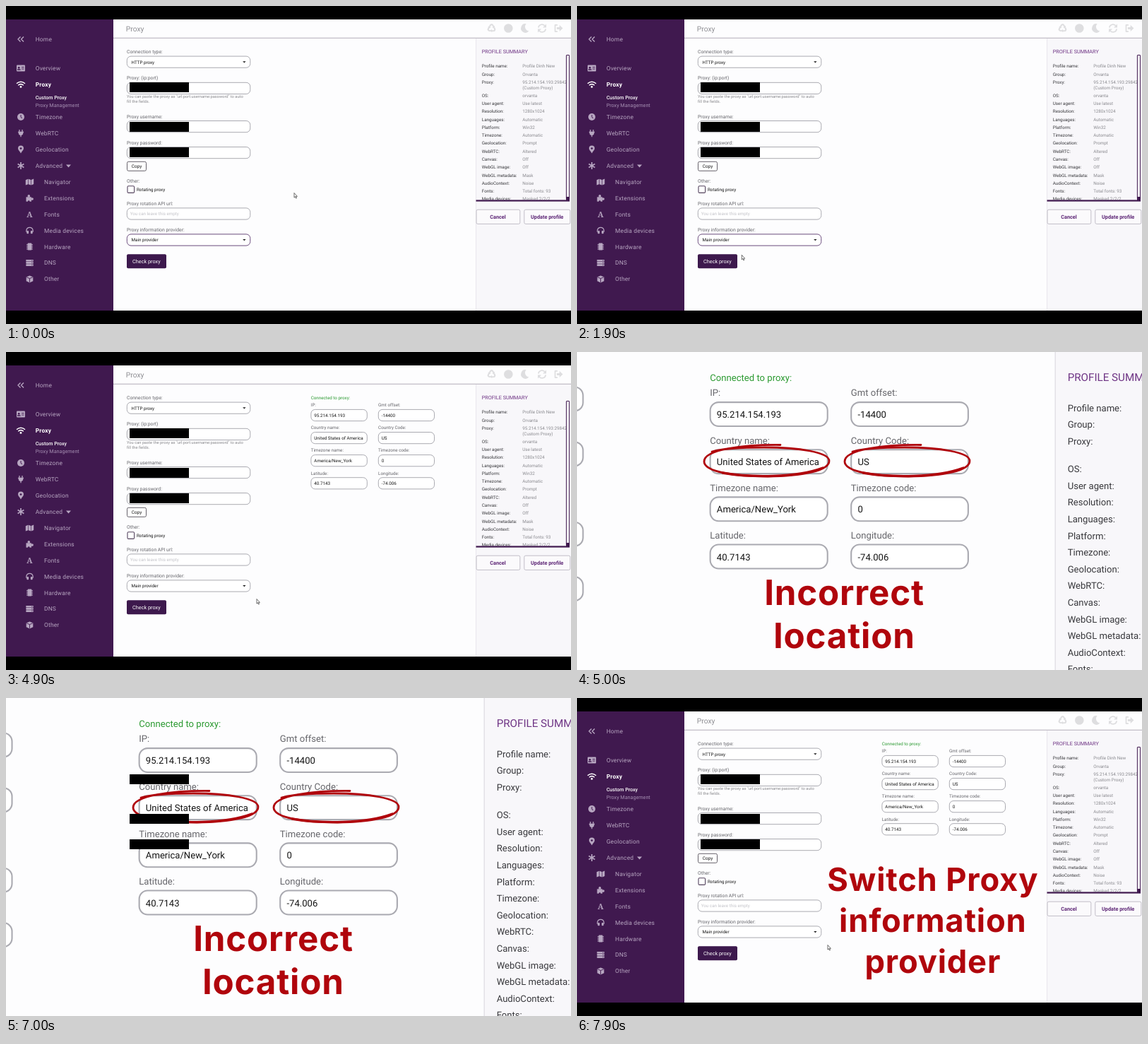
Write an HTML page with a canvas that moves like this. It is 800 px wide and 450 px high and loops after 8000 ms.

```html
<!DOCTYPE html>
<html lang="en">
<head>
<meta charset="utf-8">
<title>Proxy check</title>
<style>
html, body { margin: 0; width: 800px; height: 450px; overflow: hidden; background: #000; }
canvas { display: block; width: 800px; height: 450px; }
</style>
</head>
<body>
<canvas id="stage"></canvas>
<script>
const LOOP = 8000, CLICK = 2300, CHECK = 2500, DONE = 4000;
const ZOOM_IN = 5000, BARS = 6800, ZOOM_OUT = 7100;
const DARK = '#40194f', SIDE = '#b7a6c1', INK = '#161616', GREY = '#66666b', LINE = '#aaaab1', RED = '#b0050c';

const canvas = document.getElementById('stage');
const dpr = Math.max(1, window.devicePixelRatio || 1);
canvas.width = 800 * dpr;
canvas.height = 450 * dpr;
const c = canvas.getContext('2d');

// y is the middle of the capital letters
function text(s, x, y, size, color, weight = 400, spacing = 0, family = 'Roboto') {
  c.font = `${weight} ${size}px ${family}, sans-serif`;
  c.letterSpacing = spacing + 'px';
  c.textRendering = 'geometricPrecision';
  c.fillStyle = color;
  c.fillText(s, x, y + size * 0.356);
}
function rect(x, y, w, h, color) {
  c.fillStyle = color;
  c.fillRect(x, y, w, h);
}
function box(x, y, w, h, r, stroke, fill, lw = 1) {
  c.beginPath();
  c.roundRect(x, y, w, h, r);
  if (fill) { c.fillStyle = fill; c.fill(); }
  if (stroke) { c.strokeStyle = stroke; c.lineWidth = lw; c.stroke(); }
}
function disc(x, y, r, color) {
  c.beginPath();
  c.arc(x, y, r, 0, 7);
  c.fillStyle = color;
  c.fill();
}
function stroke(d, color, lw, cap = 'butt') {
  c.strokeStyle = color;
  c.lineWidth = lw;
  c.lineCap = cap;
  c.lineJoin = 'round';
  c.stroke(new Path2D(d));
}
function fill(d, color) {
  c.fillStyle = color;
  c.fill(new Path2D(d));
}
function at(x, y, draw) {
  c.save();
  c.translate(x, y);
  draw();
  c.restore();
}

// icons, each drawn around 0,0
const icons = {
  back() { stroke('M-.5 -3.5L-4 0L-.5 3.5M4 -3.5L.5 0L4 3.5', SIDE, 1.4); },
  card() {
    box(-6, -4.5, 12, 9, 1, null, SIDE);
    disc(-2.8, -.7, 1.4, DARK);
    rect(-5, 1.2, 4.5, 1.5, DARK);
    rect(1, -1.8, 3.6, .9, DARK);
    rect(1, .6, 3.6, .9, DARK);
  },
  wifi() {
    stroke('M-6 -1.2Q0 -6.4 6 -1.2M-3.8 1.3Q0 -2 3.8 1.3', '#fff', 1.5);
    disc(0, 3.4, 1.4, '#fff');
  },
  clock() {
    disc(0, 0, 5, SIDE);
    stroke('M0 -3V.3L2 1.8', DARK, 1);
  },
  plug() {
    stroke('M-2 -5V-2M2 -5V-2M0 2V5.2', SIDE, 1.3);
    fill('M-4 -2.2H4V-1H3.4Q3.4 3 0 3Q-3.4 3 -3.4 -1H-4Z', SIDE);
  },
  pin() {
    fill('M0 5.4C-1.4 2.8 -4 1 -4 -1.4A4 4 0 0 1 4 -1.4C4 1 1.4 2.8 0 5.4Z', SIDE);
    disc(0, -1.4, 1.4, DARK);
  },
  star() { stroke('M0 -5V5M-4.4 -2.5L4.4 2.5M-4.4 2.5L4.4 -2.5', SIDE, 1.7); },
  map() {
    fill('M-5.7 -2.8L-2.3 -4.3V3.2L-5.7 4.6ZM-1.7 -4.3L1.7 -3V4.6L-1.7 3.3ZM2.3 -3L5.7 -4.5V3L2.3 4.5Z', SIDE);
  },
  puzzle() {
    rect(-5, -1.6, 7.4, 6.4, SIDE);
    disc(-1.2, -3, 1.8, SIDE);
    disc(3.6, 1.2, 1.8, SIDE);
    disc(-1.3, 4.6, 1.3, DARK);
  },
  letter() { text('A', -4.2, 0, 11, SIDE, 700, 0, 'Noto Serif'); },
  phones() {
    stroke('M-4.6 2V0A4.6 4.4 0 0 1 4.6 0V2', SIDE, 1.3);
    box(-4.2, .2, 2.8, 4.4, 1, null, SIDE);
    box(1.4, .2, 2.8, 4.4, 1, null, SIDE);
  },
  chip() {
    box(-2.8, -5, 5.6, 10, .8, null, SIDE);
    for (let y = -3.6; y < 4; y += 2.2) rect(-4.4, y, 8.8, 1, SIDE);
  },
  server() {
    for (const y of [-4.6, -1.4, 1.8]) {
      box(-5.2, y, 10.4, 2.6, .6, null, SIDE);
      rect(2.6, y + .9, 1.4, .8, DARK);
    }
  },
  cube() {
    fill('M0 -5L4.8 -3V2.8L0 5L-4.8 2.8V-3Z', SIDE);
    stroke('M-4.4 -2.6L0 -.8L4.4 -2.6M0 -.8V4.6', DARK, .9);
  }
};

function sidebar() {
  rect(0, 19, 152, 412, DARK);
  const main = [['back', 'Home', 47], ['card', 'Overview', 88], ['wifi', 'Proxy', 111], ['clock', 'Timezone', 157],
    ['plug', 'WebRTC', 180], ['pin', 'Geolocation', 203], ['star', 'Advanced', 226]];
  for (const [icon, label, y] of main) {
    const on = label === 'Proxy';
    at(21, y, icons[icon]);
    text(label, 41.7, y, 8.4, on ? '#fff' : SIDE, on ? 700 : 400, .2);
  }
  text('Custom Proxy', 41.7, 129, 7.1, '#fff', 500);
  text('Proxy Management', 41.7, 140, 7.2, '#a58fb2');
  fill('M85 224.4H92L88.5 228.4Z', SIDE);
  const sub = [['map', 'Navigator'], ['puzzle', 'Extensions'], ['letter', 'Fonts'], ['phones', 'Media devices'],
    ['chip', 'Hardware'], ['server', 'DNS'], ['cube', 'Other']];
  sub.forEach(([icon, label], i) => {
    const y = 249 + i * 22.9;
    at(33.5, y, icons[icon]);
    text(label, 54, y, 8.4, SIDE, 400, .2);
  });
}

function header() {
  const pale = '#dedee0';
  text('Proxy', 169.8, 32, 10.3, '#8f8f94');
  rect(152, 44.8, 648, 1, '#b4aeba');
  at(687.5, 31.5, () => {
    for (let i = 0; i < 3; i++) {
      stroke('M-2.6 -3.2L-.6 -5.2H1L3.2 -2', pale, 2);
      fill('M4.6 -3.4L4 .4L1 -1.2Z', pale);
      c.rotate(Math.PI * 2 / 3);
    }
  });
  disc(711.3, 31.5, 6.3, pale);
  at(735, 31.5, () => fill('M1.6 -6.3A6.3 6.3 0 1 0 5.4 3.8A6 6 0 0 1 1.6 -6.3Z', pale));
  at(759, 31.5, () => {
    stroke('M-5.2 -1A5.2 5.2 0 0 1 4.2 -3.2M5.2 1A5.2 5.2 0 0 1 -4.2 3.2', pale, 1.7);
    fill('M6 -6V-1H1ZM-6 6V1H-1Z', pale);
  });
  at(782.5, 31.5, () => {
    stroke('M-1.6 -4.6H-5V4.6H-1.6', pale, 1.7);
    fill('M-2.6 -1.5H1.2V-4.4L6 0L1.2 4.4V1.5H-2.6Z', pale);
  });
}

function field(x, y, w, value, opt = {}) {
  box(x, y - 8.1, w, 16.2, 5.7, opt.edge || LINE, '#fff');
  if (value) text(value, x + (opt.pad || 4.4), y + .2, 6.27, opt.ink || INK);
  if (opt.arrow) fill(`M${x + w - 10.6} ${y - 1}h4.4l-2.2 2.3z`, '#222');
}

function form(t) {
  const label = (s, y) => text(s, 171, y, 6.8, GREY);
  label('Connection type:', 65);
  field(171.3, 79.2, 174.5, 'HTTP proxy', { arrow: true, pad: 6.2 });
  label('Proxy: (ip:port)', 102);
  field(171.3, 116.4, 174.5);
  text('You can paste the proxy as "url:port:username:password" to auto', 171, 128.2, 5.75, '#8a8a8e');
  text('fill the fields.', 171, 135.3, 5.75, '#8a8a8e');
  label('Proxy username:', 156.2);
  field(171.3, 170.6, 174.5);
  label('Proxy password:', 193.2);
  field(171.3, 207.6, 174.5);
  box(171.5, 220.3, 27, 13, 2, '#55505a', '#fff', .9);
  text('Copy', 177.8, 227, 6.4, INK);
  label('Other:', 247.6);
  box(172, 254.8, 9.6, 9.6, 1.4, '#54435e', '#fff', 1.1);
  text('Rotating proxy', 185, 260, 6.27, INK);
  label('Proxy rotation API url:', 279.5);
  field(171.3, 294, 174.5, 'You can leave this empty', { ink: '#c3c3c8' });
  label('Proxy information provider:', 316.5);
  field(171.3, 331, 174.5, 'Main provider', { arrow: true, pad: 6.2, edge: t < CLICK ? '#6a4a7c' : null });
  box(171, 351.3, 56, 20, 2, null, '#3d194d');
  text('Check proxy', 179, 361.6, 7.3, '#fff');
}

function result(t) {
  if (t < CHECK) return;
  if (t < DONE) return text('Checking Proxy.', 431.7, 65, 6.25, INK);
  text('Connected to proxy:', 431.7, 65, 6.27, '#2b9a31');
  const pairs = [['IP:', '95.214.154.193', 'Gmt offset:', '-14400'],
    ['Country name:', 'United States of America', 'Country Code:', 'US'],
    ['Timezone name:', 'America/New_York', 'Timezone code:', '0'],
    ['Latitude:', '40.7143', 'Longitude:', '-74.006']];
  pairs.forEach(([a, av, b, bv], i) => {
    const y = 89.5 + i * 32.1;
    text(a, 431.7, y - 14.5, 6.27, GREY);
    field(431.9, y, 79.4, av);
    text(b, 527.1, y - 14.5, 6.27, GREY);
    field(527.3, y, 79.2, bv);
  });
}

function summary() {
  rect(665.3, 46, 134.7, 385, '#f8f7fa');
  rect(665.1, 46, .7, 385, '#e2e0e6');
  text('PROFILE SUMMARY', 673.8, 64.2, 7.25, '#6f3585');
  c.save();
  c.beginPath();
  c.rect(666, 70, 127.5, 204.6);
  c.clip();
  const rows = [['Profile name:', 'Profile Dinh New'], ['Group:', 'Orvanta'], ['Proxy:', '95.214.154.193:29842'], ['OS:', 'orvanta'],
    ['User agent:', 'Use latest'], ['Resolution:', '1280x1024'], ['Languages:', 'Automatic'], ['Platform:', 'Win32'],
    ['Timezone:', 'Automatic'], ['Geolocation:', 'Prompt'], ['WebRTC:', 'Altered'], ['Canvas:', 'Off'], ['WebGL image:', 'Off'],
    ['WebGL metadata:', 'Mask'], ['AudioContext:', 'Noise'], ['Fonts:', 'Total fonts: 93'], ['Media devices:', 'Masked 2/2/2']];
  rows.forEach(([k, v], i) => {
    const y = 85.2 + i * 11.28 + (i > 2 ? 7.5 : 0);
    text(k, 673.8, y, 6.25, '#38383c');
    text(v, 731.2, y, 6.27, '#8b8b90');
  });
  text('(Custom Proxy)', 731.2, 115.8, 6.27, '#8b8b90');
  c.restore();
  box(793.4, 69.5, 4.2, 204, .5, DARK, '#f4f2f6', 1);
  rect(793, 270, 5, 5, DARK);
  rect(665.5, 274.4, 132.5, 2.2, DARK);
  box(666, 288.2, 61.8, 20.2, 2, '#bcb8c2', '#fbfafc', .9);
  text('Cancel', 685.2, 298.4, 7.3, '#5c2475', 700);
  box(733.8, 288.2, 65, 20.2, 2, '#bcb8c2', '#fbfafc', .9);
  text('Update profile', 743, 298.4, 7.3, '#5c2475', 700);
}

// time, x, y: rest, one sweep to the button, off it, then away
const path = [[0, 408, 264.5], [1100, 408, 264.5], [2100, 213, 362.5],
  [2600, 213, 362.5], [3100, 244, 355.8], [4000, 244, 355.8], [4700, 355, 349.5], [LOOP, 355, 349.5]];

function pointer(t) {
  const i = path.findIndex(p => p[0] > t);
  const [t0, x0, y0] = path[i - 1], [t1, x1, y1] = path[i];
  const u = (t - t0) / (t1 - t0), k = u * u * (3 - 2 * u);
  at(x0 + (x1 - x0) * k, y0 + (y1 - y0) * k, () => {
    const d = 'M0 0V6.6L1.5 5.2L2.5 7.6L3.5 7.2L2.5 4.9H4.4Z';
    fill(d, '#fff');
    stroke(d, '#333', .7);
  });
}

function page(t) {
  rect(0, 0, 800, 450, '#000');
  rect(152, 19, 648, 412, '#fdfdfe');
  sidebar();
  header();
  form(t);
  result(t);
  summary();
  pointer(t);
}

function bars() {
  for (const y of [108, 164, 200]) rect(175, y, 84, 14, '#000');
}

function title(lines, x, y, size, step) {
  c.textAlign = 'center';
  lines.forEach((s, i) => text(s, x, y + i * step - size * .356, size, RED, 700, .8, 'Inter'));
  c.textAlign = 'left';
}

function ring(x) {
  at(x, 155, () => {
    stroke('M20 -23.5C-33 -24 -88 -17 -88 0C-88 15 -43 21 2 21C50 21 89.5 13 89 -1C89 -13 47 -20 -3 -20C-33 -20 -63 -18 -77 -14', RED, 2.8, 'round');
    stroke('M-62 16C-22 23 42 23 80 9', RED, 3.4, 'round');
  });
}

function draw(t) {
  const zoomed = t >= ZOOM_IN && t < ZOOM_OUT;
  c.setTransform(dpr, 0, 0, dpr, 0, 0);
  c.save();
  if (zoomed) c.transform(2.092, 0, 0, 2.092, -714.9, -99.2);
  page(t);
  c.restore();
  if (zoomed) {
    ring(268);
    ring(467);
    title(['Incorrect', 'location'], 378.5, 358, 49.3, 61);
  }
  if (!zoomed || t >= BARS) bars();
  if (t >= ZOOM_OUT) title(['Switch Proxy', 'information', 'provider'], 503.8, 273, 45.3, 58);
}

const start = performance.now();
function tick() {
  const t = (performance.now() - start) % LOOP;
  draw(Math.floor(t / 100) * 100);
  requestAnimationFrame(tick);
}
tick();
</script>
</body>
</html>
```
